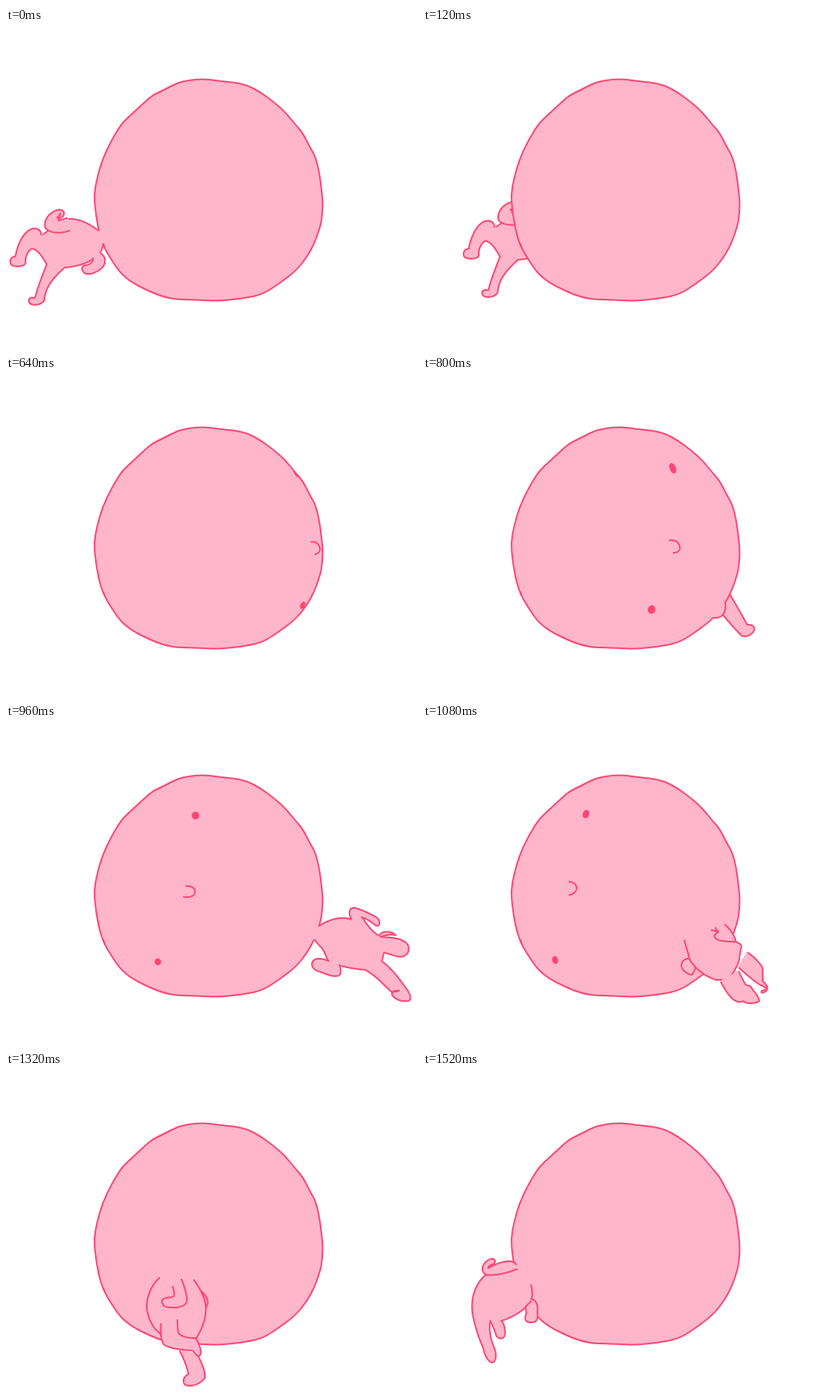
Animation of 525x409 px, one loop 1560 ms. Source, as an HTML page with a canvas:

```html
<!DOCTYPE html>
<html lang="en">
<head>
<meta charset="utf-8">
<title>Running round</title>
<style>
  html, body { margin: 0; width: 100%; height: 100%; overflow: hidden; background: #fff; }
  canvas { display: block; }
</style>
</head>
<body>
<canvas id="stage" width="525" height="409"></canvas>
<script>
const ctx = document.getElementById('stage').getContext('2d');
const LOOP = 1560, STEP = 40, SAMPLES = 100;
const LINE = '#ff4573', SKIN = '#ffb6ca';

const headPoints = [
  [253, 65], [267, 67], [289, 69.5], [293, 70], [308, 73], [325, 82], [344, 96], [358, 109],
  [370, 124], [379, 134], [388, 152], [395, 164], [400, 183], [403, 206], [405, 226],
  [403, 247], [400, 258], [394, 275], [386, 290], [372, 309], [350, 326], [327, 341],
  [300, 346], [270, 349], [248, 347.5], [219, 347], [202, 344], [184, 337], [160, 325],
  [145, 312], [132, 292], [124, 278], [118, 258], [114, 232], [112.5, 213], [116, 193],
  [123, 168], [135, 143], [146, 125], [152, 118], [166, 105], [178, 94], [187, 86],
  [200, 80], [219, 70], [235, 66.5]
];

const head = new Path2D();
headPoints.forEach(([x, y], i) => {
  const [nx, ny] = headPoints[(i + 1) % headPoints.length];
  const mx = (x + nx) / 2, my = (y + ny) / 2;
  if (i) head.quadraticCurveTo(x, y, mx, my);
  else head.moveTo(mx, my);
});
head.quadraticCurveTo(...headPoints[0], 260, 66);
head.closePath();

// Evenly spaced points along an SVG path
function sample(d) {
  const path = document.createElementNS('http://www.w3.org/2000/svg', 'path');
  path.setAttribute('d', d);
  const len = path.getTotalLength();
  return Array.from({ length: SAMPLES + 1 }, (_, i) => {
    const p = path.getPointAtLength(len * i / SAMPLES);
    return [p.x, p.y];
  });
}
const mapParts = (pose, fn) =>
  Object.fromEntries(Object.entries(pose).map(([k, v]) => [k, fn(v)]));
const shift = (pose, dx, dy) =>
  mapParts(pose, pts => pts.map(([x, y]) => [x + dx, y + dy]));

const left = mapParts({
  torso: 'M118,259 C105,249 92,243 78,244 L60,255 L44,266 L52,303 L75,306 C95,305 112,297 118,290 C122,285 124,280 124,276',
  legA: 'M52,302 C46,317 40,333 37,345 C28,343 27,350 32,353 C38,355 46,353 49,348 C50,330 62,318 75,306',
  legB: 'M45,264 C44,255 35,255 30,258 C20,264 14,280 12,292 C5,292 4,300 7,303 C13,306 22,305 25,301 C24,292 28,285 33,282 C40,283 45,290 52,302',
  armA: 'M81,259 C68,264 53,261 50,255 C48,246 54,238 62,234 C70,230 75,234 74,238 C73,243 66,244 65,242 C68,241 70,239 69,237 L67,246 L78,243',
  armB: 'M121,288 C128,292 128,302 122,307 C114,314 104,316 100,313 C95,308 97,303 103,303 C108,302 112,298 111,294'
}, sample);

const right = mapParts({
  torso: 'M394,276 L401,284 C406,287 408,297 412,303 L427,309 C435,311 450,314 460,314 L480,303 L483,292 L477,271 C470,267 463,260 455,247 L441,250 C428,245 412,250 400,258',
  legA: 'M483,292 C497,296 505,301 512,294 C516,290 516,281 507,277 C500,273 490,273 478,272 C482,271 490,268 498,270 C492,264 480,264 477,270',
  legB: 'M458,314 C472,321 482,333 493,343 L502,341 C497,340 492,342 493,346 C498,354 510,356 516,353 C518,348 514,341 509,335 C502,325 492,312 480,303',
  armA: 'M441,249 C436,239 440,234 446,235 C456,238 466,243 473,247 C479,251 478,259 473,258 C467,254 462,249 454,247',
  armB: 'M412,303 C405,300 396,298 392,303 C388,310 394,315 402,317 C412,321 420,324 426,321 C429,317 427,312 426,308'
}, sample);

const peek = {
  ...shift(right, -105, -8),
  legA: shift(right, -140, -8).legA,
  legB: sample('M383,305 C390,314 400,325 407,332 C411,334 418,332 422,327 C425,322 422,317 414,318 C408,306 400,293 392,279'),
  armB: sample('M372,309 C382,310 388,302 386,290')
};

const frontRight = mapParts({
  torso: 'M294,277 C291,290 294,306 300,318 C307,331 318,338 328,340 L352,325 L374,307 C366,288 357,276 347,267',
  legA: 'M351,325 C365,343 382,362 390,376 C390,380 385,378 382,384 C381,389 388,390 395,388 C402,388 408,383 409,376 C400,355 384,326 374,307',
  legB: 'M329,341 C328,352 332,361 338,363 C352,365 365,360 372,355 L361,340 L355,342 C353,336 352,330 353,326',
  armA: 'M329,268 C331,277 337,283 333,287 C326,289 316,289 316,294 C316,300 325,300 333,299 C344,297 351,292 350,284 C348,275 344,268 340,263',
  armB: 'M293,298 C287,299 286,307 290,313 C293,318 298,322 302,322 C297,316 294,306 293,299'
}, sample);

const frontLeft = mapParts({
  torso: 'M196,263 C184,274 179,290 180,303 C182,318 190,330 197,334 L199,340 L243,340 C255,322 256,305 255,298 C253,285 246,274 240,266',
  legA: 'M222,357 C227,366 231,377 233,386 C226,390 225,396 229,400 C237,403 248,399 254,391 C255,383 250,372 245,362',
  legB: 'M198,322 C197,332 198,342 201,348 C212,355 228,355 238,356 C241,358 242,363 247,363 C250,360 249,355 247,350 C245,344 243,340 240,340 C230,340 222,337 220,333 C219,327 219,322 219,317',
  armA: 'M213,274 C214,279 216,284 214,287 C207,289 199,288 199,294 C201,302 210,301 217,301 C227,300 232,296 231,290 C230,280 227,272 224,265',
  armB: 'M249,280 C258,287 260,296 255,301 C255,293 252,286 250,281'
}, sample);

const leaving = mapParts({
  torso: 'M119,247 L79,260 C66,272 61,290 63,307 L86,319 L100,318 C115,314 132,302 138,294 C140,288 140,280 138,272',
  legA: 'M86,319 C90,325 92,332 94,338 C100,343 105,340 105,333 C104,326 104,322 100,318',
  legB: 'M63,307 C66,325 72,342 77,353 C79,364 85,373 90,371 C94,368 94,358 90,350 C86,340 84,330 86,318',
  armA: 'M120,252 C108,257 90,261 80,259 C74,255 75,248 80,243 C86,237 93,238 92,243 C90,247 84,246 83,251 C92,245 105,241 113,242 C116,243 118,244 119,246',
  armB: 'M138,290 C146,292 147,300 146,306 C147,315 146,320 139,320 C130,321 129,314 132,309 L131,300 L138,293'
}, sample);

const bodyKeys = [
  [0, left], [320, shift(left, 165, -35)],
  [640, shift(right, -180, -20)], [800, peek], [960, right],
  [1160, frontRight], [1320, frontLeft], [1520, leaving], [LOOP, left]
];

// Each eye: x, y, rx, ry, tilt in degrees
const faceKeys = [
  [640, { eyes: [[371, 124, 3, 6, -32], [379, 293, 3, 5, 25]],
    nose: sample('M390,212 C396,211 401,216 401,221 C401,225 398,227 395,228') }],
  [800, { eyes: [[319, 118, 4, 7, -22], [292, 298.5, 4.8, 5.5, 20]],
    nose: sample('M315,210 C322,209 328,213 328,219 C328,224 324,226 320,226') }],
  [960, { eyes: [[242, 117, 4.8, 5, 0], [194, 304, 4.2, 4.4, 0]],
    nose: sample('M230,207 C238,207 243,211 241,216 C240,221 232,222 227,221') }],
  [1160, { eyes: [[185.5, 114, 3.8, 5.8, 28], [152, 300, 3.5, 5.6, -25]],
    nose: sample('M158,198 C164,198 167,205 166,209 C165,213 163,215 160,217') }],
  [1240, { eyes: [[168, 109, 2.5, 5.5, 38], [133, 293, 2.5, 5.5, -30]],
    nose: sample('M121,194 C126,195 129,201 128,205 C127,209 125,211 122,213') }]
];

const mix = (a, b, k) =>
  Array.isArray(a) ? a.map((v, i) => mix(v, b[i], k)) : a + (b - a) * k;

function poseAt(keys, t, ease = k => k) {
  let i = keys.findIndex(([time]) => time > t) - 1;
  if (i < 0) i = keys.length - 2;
  const [t0, a] = keys[i], [t1, b] = keys[i + 1];
  const k = ease((t - t0) / (t1 - t0));
  return Object.fromEntries(Object.keys(a).map(n => [n, mix(a[n], b[n], k)]));
}

function trace(pts) {
  ctx.beginPath();
  pts.forEach(p => ctx.lineTo(p[0], p[1]));
}

function outline(pts) {
  trace(pts);
  ctx.strokeStyle = LINE;
  ctx.lineWidth = 2;
  ctx.stroke();
}

// Open outline; the joint between its two ends is wiped clean
function drawPart(pts) {
  trace(pts);
  ctx.fillStyle = SKIN;
  ctx.fill();
  trace([pts[0], pts[SAMPLES]]);
  ctx.lineCap = 'butt';
  ctx.strokeStyle = SKIN;
  ctx.lineWidth = 4;
  ctx.stroke();
  ctx.lineCap = 'round';
  outline(pts);
}

function drawFace(t) {
  const { eyes, nose } = poseAt(faceKeys, t);
  ctx.save();
  ctx.clip(head);
  ctx.fillStyle = LINE;
  for (const [x, y, rx, ry, tilt] of eyes) {
    ctx.beginPath();
    ctx.ellipse(x, y, rx, ry, tilt * Math.PI / 180, 0, 7);
    ctx.fill();
  }
  outline(nose);
  ctx.restore();
}

function drawHead(t) {
  ctx.fillStyle = SKIN;
  ctx.fill(head);
  ctx.strokeStyle = LINE;
  ctx.lineWidth = 2;
  ctx.stroke(head);
  outline([[124.5, 276], [126, 281]]);
  if (t >= 640 && t <= 1240) drawFace(t);
}

function draw(t) {
  ctx.fillStyle = '#fff';
  ctx.fillRect(0, 0, 525, 409);
  ctx.lineJoin = ctx.lineCap = 'round';
  if (t >= 320 && t < 640) return drawHead(t);

  const body = poseAt(bodyKeys, t, t < 320 ? k => k * (0.6 + 0.4 * k) : undefined);
  const parts = names => names.forEach(n => drawPart(body[n]));
  if (t > 0 && t < 960) {
    parts(['torso', 'legA', 'legB', 'armA']);
    if (t < 800) parts(['armB']);
    drawHead(t);
    if (t >= 800) parts(['armB']);
  } else {
    const armInFront = t < 1080 || t > 1440;
    drawHead(t);
    if (!armInFront) parts(['armB']);
    parts(['torso', 'legA', 'legB', 'armA']);
    if (armInFront) parts(['armB']);
  }
}

const start = performance.now();
function tick() {
  const t = (performance.now() - start) % LOOP;
  draw(Math.floor(t / STEP) * STEP);
  requestAnimationFrame(tick);
}
tick();
</script>
</body>
</html>
```
